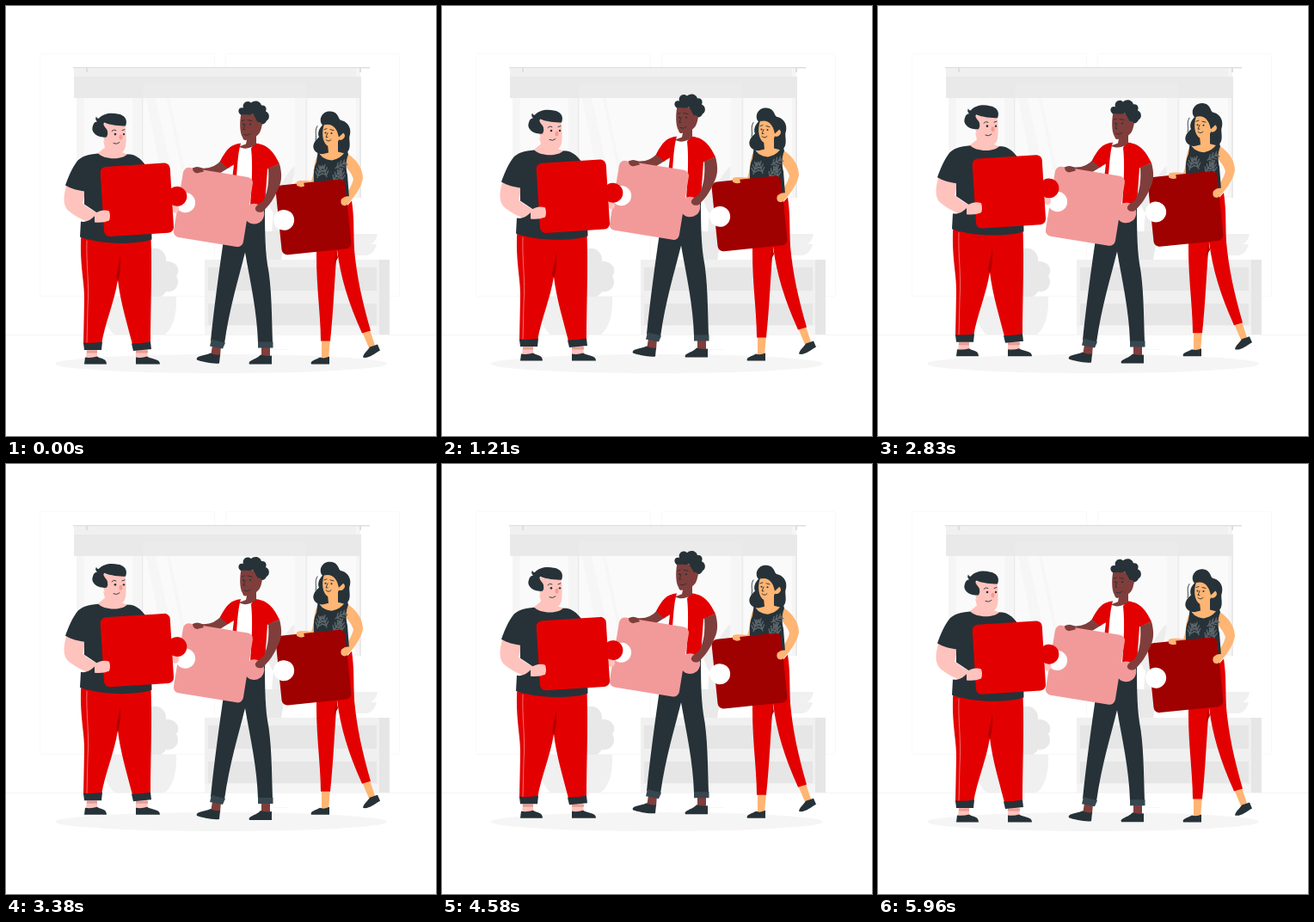
An HTML page for the animation above (6000 ms loop, 500 by 500 pixels).

```html
<!DOCTYPE html>
<html lang="en">
<head>
<meta charset="utf-8">
<title>Teamwork</title>
<style>
html, body { margin: 0; width: 100%; height: 100%; overflow: hidden; background: #fff; }
svg { display: block; width: 100vw; height: 100vh; }
.dark { fill: #263238; }
.cuff { fill: #37474f; }
.red { fill: #e30000; }
.rose { fill: #ffc3bd; }
.brown { fill: #7f3e3b; }
.tan { fill: #ffb573; }
.line { fill: none; stroke: #263238; stroke-width: .9; stroke-linecap: round; }
.leaf { fill: none; stroke: #5d676c; stroke-width: 1.4; stroke-linecap: round; }
</style>
</head>
<body>
<svg viewBox="0 0 500 500">
  <defs>
    <rect id="tile" width="80" height="80" rx="6.5"/>
    <path id="sprig" class="leaf" d="M0 0V-14M0-2l-4-4M0-2l4-4M0-6l-4-4M0-6l4-4M0-10l-3-4M0-10l3-4"/>
  </defs>

  <!-- room -->
  <g fill="none" stroke="#f8f8f8">
    <rect x="39.500" y="55.500" width="203" height="282" rx="2"/>
    <rect x="255.500" y="55.500" width="202" height="282" rx="2"/>
  </g>
  <path fill="#f5f5f5" d="M82 73H412V223H82Z"/>
  <path fill="#fafafa" d="M91 107H147V223H91ZM160 107H348V223H160ZM351 107H407V221H351Z"/>
  <path fill="#f6f6f6" d="M163 107H174L192 190V223H186ZM187 107H190L208 190H204ZM336 107H348V223H336Z"/>
  <path fill="#e9e9e9" d="M158 90h1v133h-1zM348.500 90h1v133h-1zM411 82h2v141h-2z"/>
  <path fill="#f0f0f0" d="M79 73H407V82H79Z"/>
  <path fill="#e9e9e9" d="M79 82H412V107H79Z"/>
  <path fill="#ebebeb" d="M159 90H349V107H159Z"/>
  <path fill="#dedede" d="M78 71H423V72.500H78ZM93 72h2v5h-2zM411 72h2v5h-2z"/>
  <path fill="#f5f5f5" d="M0 382H500V383H0ZM310 399h18v.7h-18zM428 395h12v.7h-12z"/>
  <path fill="#f0f0f0" d="M231 295H446V372H231Z"/>
  <path fill="#e6e6e6" d="M235 304H431V331H235ZM235 346H431V371H235ZM434 295H446V382H434Z"/>
  <path fill="#f5f5f5" d="M231 372H434V382H231Z"/>
  <path fill="#e8e8e8" d="M166 284C176 278 187 285 186 297C198 296 204 307 198 314C204 324 196 334 186 332C182 340 170 342 166 338Z"/>
  <path fill="#f0f0f0" d="M112 338H198C199 359 194 374 185 382H126C116 374 112 356 112 338Z"/>
  <path fill="#ededed" d="M310 286C307 245 314 207 335 186C337 194 334 204 329 212C337 204 343 202 348 204C346 220 326 240 319 287ZM310 240C300 222 302 204 307 194C316 204 318 222 316 242Z"/>
  <path fill="#e9e9e9" d="M300 262H326L320 295H304Z"/>
  <path fill="#f0f0f0" d="M390 265H432C431 271 428 275 424 277H431C429 285 424 290 418 290H390Z"/>
  <ellipse cx="250" cy="416" rx="193" ry="11" fill="#f5f5f5"/>

  <!-- woman -->
  <g id="woman">
    <path class="tan" d="M367 386H377L375 410H367ZM414 378L423 376L429 394L422 397Z"/>
    <path class="dark" d="M365 408Q370 410 376 407V416H355C353 412 360 411 365 408ZM423 396L432 393L435 400C428 404 421 410 415 408C416 403 420 401 423 396Z"/>
    <path class="red" d="M361.500 270C359 315 366 355 366 389H377C381 352 382 315 385 283C389 315 398 344 414 380L424 377C414 342 408 315 405 283C404 262 405 245 402 226Z"/>
    <path fill="#b80000" d="M384 283L381 302L386 292Z"/>
    <path class="dark" d="M368 138C363 132 367 123 375 122C382 121 386 125 388 132C396 133 402 140 400 149C398 153 401 160 399 166C396 174 383 174 379 169C374 174 361 173 358 166C356 161 359 156 364 152C362 147 364 142 368 138Z"/>
    <path class="line" d="M362 139C358 146 362 150 360 155"/>
    <path class="tan" d="M362 174C357 183 359 194 355 203C349 202 341 202 338 204V209L347 210L360 207L366 182Z"/>
    <path class="tan" d="M374 160L386 156V169L398 172C409 179 415 190 415 200C413 211 405 222 396 231C390 233 388 228 390 223C397 217 402 209 404 201C402 194 398 190 395 186L368 181L363 173L375 170Z"/>
    <path class="tan" d="M370 137C378 135 384 138 386 144C389 147 393 145 394 150C394 154 390 156 387 155C385 161 380 164 376 163C369 161 366 149 370 137Z"/>
    <path class="dark" d="M369 138C374 136 380 137 383 142C386 146 386 149 387 152C390 149 394 146 395 143L388 131L376 132Z"/>
    <path class="line" d="M370 143l3-1M377 143l4 1M372 155q3 3 6 0M374 147l-2 5h2"/>
    <circle class="dark" cx="371.500" cy="147" r="1"/><circle class="dark" cx="378.500" cy="147.500" r="1"/>
    <path class="dark" d="M363 166C364 174 370 178 379 179C388 177 394 172 396 164L398 172C395 179 395 188 397 196L399 222H357C360 205 355 193 361 181Z"/>
    <use href="#sprig" transform="translate(362 199) rotate(18)"/>
    <use href="#sprig" transform="translate(373 198) rotate(-20)"/>
    <use href="#sprig" transform="translate(380 203) rotate(35)"/>
    <use href="#sprig" transform="translate(391 203) rotate(-10)"/>
    <use href="#sprig" transform="translate(383 188) rotate(60)"/>
    <g transform="translate(313 208.500) rotate(-5.800) scale(1.015)" fill="#9f0000">
      <use href="#tile"/><circle cx="6" cy="40" r="11.800" fill="#fff"/>
    </g>
    <path class="tan" d="M338 204Q342 201 346 204L347 209Q342 211 338 208ZM390 224C393 221 397 220 400 221L401 225L396 231C391 233 388 229 390 224Z"/>
  </g>

  <!-- tall man -->
  <g id="tall">
    <path class="brown" d="M240 394H250L249 407H238ZM297 394H307V408H297Z"/>
    <path class="dark" d="M238 403Q243 406 249 405L248 415C240 416 228 413 222 411C220 406 232 406 238 403ZM296 405Q302 407 309 406V416H283C281 411 291 411 296 405Z"/>
    <path class="dark" d="M254 265L301 230C301 255 301 278 304 300C309 325 309 360 310 391H293C292 355 284 320 278 286C270 318 260 350 254 392L238 389C242 350 248 305 254 265Z"/>
    <path class="cuff" d="M239 387L255 391L252 398L237 395ZM293 390H310.500V397H293Z"/>
    <path class="brown" d="M251 178L260 187L247 195L228 193L219 192L217 188L228 188Q242 189 251 178Z"/>
    <path fill="#fff" d="M269 162H288L287 232H266Z"/>
    <path class="red" d="M273 159C261 161 257 165 249 180L258 188L265 184L262 210H267C269 190 269 173 273 159Z"/>
    <path class="red" d="M289 159C302 160 310 166 318 183L304 189L301 231H284C286 205 287 183 285 165Z"/>
    <path class="brown" d="M274 122C271 134 272 148 275 152C276 156 278 156 280 155L279 160L271 163C277 167 285 165 291 160V151C297 147 299 138 296 128Z"/>
    <path class="dark" d="M273 126C268 122 271 116 276 118C274 112 281 108 285 112C289 108 296 110 297 115C301 114 304 118 302 122C307 124 307 131 303 133C301 138 296 138 293 135C291 132 290 129 287 125C283 127 277 125 273 126Z"/>
    <circle class="brown" cx="294" cy="138" r="3.500"/>
    <path class="line" d="M274 133l3-1M281 132l5 1M277 149q4 2 7-1M278 137l-2 6h2"/>
    <circle class="dark" cx="276" cy="137" r="1"/><circle class="dark" cx="284" cy="137" r="1"/>
    <g transform="translate(207 186.300) rotate(9.200) scale(1.025)" fill="#f29a9a">
      <use href="#tile"/><circle cx="87" cy="40" r="11.500"/>
      <circle cx="8" cy="40" r="11.300" fill="#fff"/>
    </g>
    <path class="brown" d="M217 188Q222 185 228 188L230 192L222 194Q217 193 217 188Z"/>
    <path class="brown" d="M305 188L318 183C321 194 321 203 317 211C312 223 306 232 298 239C293 240 289 238 290 234C292 230 296 229 299 226C305 215 306 203 305 188Z"/>
  </g>

  <!-- stout man -->
  <g id="stout">
    <path class="rose" d="M94 398H106V411H93ZM151 398H164L165 411H151Z"/>
    <path fill="#e59d96" d="M94 400H106V403H94ZM151 400H165V403H151Z"/>
    <path class="dark" d="M92 408Q99 409 106 407C110 410 117 409 117 416H91ZM151 408Q158 409 164 407C170 411 179 409 179 416H151Z"/>
    <path class="red" d="M87.500 264C85 300 92 322 91 343L90 393H111C115 368 126 344 130 318C133 344 141 369 147 393H168C168 350 170 312 168.500 266Z"/>
    <path fill="#b00000" d="M133 290Q134 307 130 320L128 315Z"/>
    <path d="M94 272C93 300 97 320 95 350L94 391" fill="none" stroke="#f58a8a" stroke-width=".8"/>
    <path class="dark" d="M90 391Q101 392 112 390L111 399.500H91ZM146 392Q158 392 168 390L169 398.500L148 400.500Z"/>
    <path class="rose" d="M71 206C66 221 66 232 73 238C82 245 93 251 103 252L120 250L121 239L106 240C100 237 95 234 89 229L93 212Z"/>
    <path class="dark" d="M107 171C96 172 87 174 82 181C76 189 72 200 69 208C76 212 84 214 91 215V230L106 240C99 250 91 251 87 250L86 268C106 276 148 278 169.500 271L168 195C163 184 156 174 145 172Z"/>
    <path class="rose" d="M113 156L115 164L107 170.500C113 178 134 179 141 172L131 168Z"/>
    <path class="rose" d="M114 136C123 138 132 139 138 137C140 146 140 156 139 163C137 171 132 172 125 169C117 166 113 156 113 148Z"/>
    <path class="dark" d="M117 152C106 153 98 146 101 139C102 135 104 134 106 134Q103 131 105 128Q106 131 108 130C113 124 123 123 130 125C138 126 142 132 139 139C132 139 121 138 114 135C112 139 117 141 118 145Q119 149 117 152Z"/>
    <path class="line" d="M123 145q2-3 5-1M135 144l3-1M125 159q4 2 7-1"/>
    <circle class="dark" cx="127" cy="148.500" r="1.300"/><circle class="dark" cx="137" cy="148.500" r="1.200"/>
    <ellipse cx="133.500" cy="152" rx="2" ry="3" fill="#f59a94"/>
    <ellipse class="rose" cx="197" cy="235" rx="4" ry="5"/>
    <g transform="translate(109.300 186.700) rotate(-3.600) scale(1.015)" class="red">
      <use href="#tile"/><circle cx="86" cy="39" r="11.300"/>
    </g>
    <path class="rose" d="M103 241C109 237 115 236 120 238Q122 244 120 249Q113 252 103 251Z"/>
  </g>
</svg>
<script>
const REST = 0.6, RISE = 10;
const triangle = (t, period) => 1 - Math.abs(1 - 2 * (t % period) / period);
const lift = (id, amount) =>
  document.getElementById(id).setAttribute('transform', `translate(0 ${REST - RISE * amount})`);

function draw() {
  const t = performance.now();
  const slow = triangle(t, 6000);
  lift('stout', slow);
  lift('woman', slow);
  lift('tall', triangle(t, 3000));
  requestAnimationFrame(draw);
}
draw();
</script>
</body>
</html>
```
